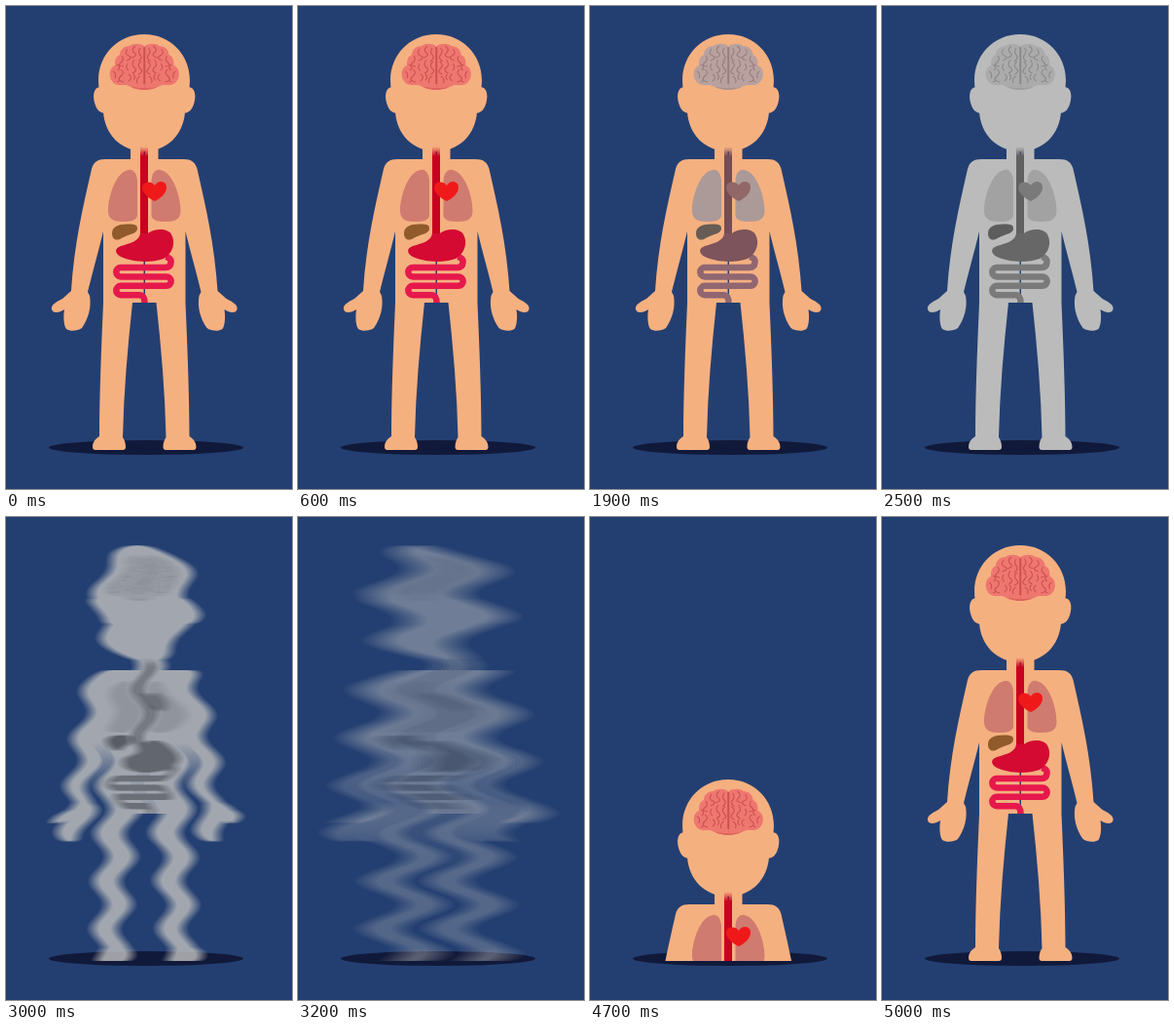
An HTML page with a canvas for the animation above (6000 ms loop, 294 by 495 pixels).

```html
<!DOCTYPE html>
<html lang="en">
<head>
<meta charset="utf-8">
<title>Body</title>
<style>
html, body { margin: 0; width: 100%; height: 100%; overflow: hidden; background: #233f71; }
canvas { display: block; width: 100%; height: 100%; }
</style>
</head>
<body>
<canvas id="stage" width="294" height="495"></canvas>
<script>
const W = 294, H = 495, LOOP = 6000, STEP = 100, FLOOR = 455, AXIS = 142.25;
const stage = document.getElementById('stage').getContext('2d');
const layer = () => {
  const c = document.createElement('canvas');
  c.width = W;
  c.height = H;
  return c.getContext('2d');
};
const figure = layer(), wavy = layer();

// Adds the mirror image of a half shape
const both = d => {
  const half = new Path2D(d), p = new Path2D(half);
  p.addPath(half, new DOMMatrix([-1, 0, 0, 1, 2 * AXIS, 0]));
  return p;
};

const skin = { rgb: [245, 176, 128], gray: 187 };
const head = new Path2D(`M95 76C95 50 115 29 142 29S189 50 189 76C189 90 184 98 184 108
  C183 131 166 149 142 149S101 131 100 108C100 98 95 90 95 76Z`);
const ears = both('M97 83C90 83 89 92 91 99C93 106 96 110 103 110V83Z');
const trunk = both(`M143 140H128V157H102C94 157 90 160 88 167C79 206 70 245 67 292L58 300
  C50 304 46 307 47 311C48 315 54 315 60 311C59 317 59 327 62 331C66 334 74 333 78 330
  C85 320 88 308 86 297L84 293C89 272 95 252 100 231V304C98 350 96 400 96 441
  C91 444 89 448 89 452Q89 455 92 455H120Q123 455 123 452C123 448 122 445 120 442
  C121 396 125 350 130 304H143Z`);

const gut = new Path2D(`M164 257Q170 258 169.5 263Q169 268 164 268H118a4.7 4.7 0 0 0 0 9.4
  H165a4.7 4.7 0 0 1 0 9.4H118a4.7 4.7 0 0 0 0 9.4H137Q142.5 296 142.5 304`);
const gutTone = { rgb: [230, 24, 76], gray: 122 };
const gulletTone = { rgb: [201, 3, 31], gray: 96 };

const lung = `M126 168C131 167 135 172 135 180V215C134 220 128 221 120 221
  C110 221 105 218 105 210C105 195 113 170 126 168Z`;
const lungTone = { rgb: [207, 123, 112], gray: 162 };
const mirrored = d => {
  const p = new Path2D();
  p.addPath(new Path2D(d), new DOMMatrix([-1, 0, 0, 1, 2 * AXIS, 0]));
  return p;
};
const organs = [
  { x: 122, y: 232, rgb: [144, 90, 43], gray: 93, path: new Path2D(`M113 226C118 223 130 223 134 225
    C136 228 135 231 131 233C125 235 120 237 117 239C111 241 109 237 109 233Q109 228 113 226Z`) },
  { x: 120, y: 195, ...lungTone, path: new Path2D(lung) },
  { x: 164.5, y: 195, ...lungTone, path: mirrored(lung) },
  { x: 143, y: 246, rgb: [212, 10, 50], gray: 103, path: new Path2D(`M138 233H146
    C152 228 166 227 170 234C175 243 171 254 162 259C148 264 128 262 118 257
    C111 253 112 248 118 246C128 243 137 241 138 233Z`) },
  { x: 153, y: 190, rgb: [240, 25, 25], gray: 122, path: new Path2D(`M153 200C146 197 140 191 140 186
    C140 180 149 178 153 184C156 178 165 179 165 186C165 192 159 197 153 200Z`) }
];

const lobes = both(`M142 41C138 38 130 38 127 41C121 41 117 45 117 50C112 52 112 57 112 61
  C106 63 105 72 109 77C112 82 119 81 124 81C129 84 137 84 142 84Z`);
const stem = new Path2D('M124 79Q142 76 160 79C156 84 150 86 142 86S128 84 124 79Z');
const folds = both(`M141.8 42V80M138 43Q135 47 138 50T136 57M133 41Q128 45 132 48T129 53
  M125 44Q121 49 126 51T124 56M119 51Q122 55 118 58T121 62M139 57Q134 60 138 64T136 70
  M132 55Q128 60 132 63T130 69M125 59Q122 64 126 66M114 60Q119 62 115 66M110 67Q114 69 112 74
  M118 65Q123 68 118 72T121 78M126 70Q131 73 126 77M138 72Q133 74 135 79M114 78Q118 77 116 74
  M131 70Q134 72 131 76`);

const clamp = v => Math.min(1, Math.max(0, v));
const ramp = (t, a, b) => clamp((t - a) / (b - a));
const tone = ({ rgb, gray }, k, alpha = 1) =>
  `rgba(${rgb.map(c => Math.round(c + (gray - c) * k))},${alpha})`;

function fill(g, path, color) {
  g.fillStyle = color;
  g.fill(path);
}

function line(g, path, color, width) {
  g.strokeStyle = color;
  g.lineWidth = width;
  g.stroke(path);
}

function scaled(g, x, y, s, draw) {
  g.save();
  g.translate(x, y);
  g.scale(s, s);
  g.translate(-x, -y);
  draw();
  g.restore();
}

// Quick beats that slow down and stop
function squeezed(t) {
  if (t < 700) return t / STEP % 2 === 1;
  return t < 900 || (t >= 1100 && t < 1300);
}

function drawFigure(g, t) {
  const alive = t >= 4000;
  const organGray = alive ? 0 : ramp(t, 1500, 2000);
  const bodyGray = alive ? 0 : ramp(t, 2000, 2500);
  const beat = squeezed(t) ? 0.94 : 1;
  g.clearRect(0, 0, W, H);
  for (const p of [trunk, ears, head]) fill(g, p, tone(skin, bodyGray));

  line(g, gut, tone(gutTone, organGray), 6.5);
  const fade = g.createLinearGradient(0, 144, 0, 154);
  fade.addColorStop(0, tone(gulletTone, organGray, 0));
  fade.addColorStop(1, tone(gulletTone, organGray));
  g.fillStyle = fade;
  g.fillRect(138, 144, 8, 94);
  for (const o of organs)
    scaled(g, o.x, o.y, beat, () => fill(g, o.path, tone(o, organGray)));

  scaled(g, AXIS, 62, beat, () => {
    fill(g, stem, tone({ rgb: [222, 99, 94], gray: 158 }, organGray));
    fill(g, lobes, tone({ rgb: [238, 119, 112], gray: 171 }, organGray));
    line(g, folds, tone({ rgb: [205, 80, 80], gray: 138 }, organGray), 1.1);
  });
}

// Shifts each row sideways, then smears the rows and fades them
function drawWavy(p) {
  const amp = 42 * p, smear = 36 * p, copies = 11;
  wavy.clearRect(0, 0, W, H);
  for (let y = 20; y < 460; y++) {
    const dx = amp * Math.cos((y - 152) / 49 * 2 * Math.PI);
    wavy.drawImage(figure.canvas, 0, y, W, 1, dx, y, W, 1);
  }
  figure.clearRect(0, 0, W, H);
  figure.globalCompositeOperation = 'lighter';
  figure.globalAlpha = 1 / copies;
  for (let i = 0; i < copies; i++)
    figure.drawImage(wavy.canvas, (i / (copies - 1) - 0.5) * 2 * smear, 0);
  figure.globalCompositeOperation = 'source-over';
  figure.globalAlpha = 1;
  stage.globalAlpha = 1 - p;
  stage.drawImage(figure.canvas, 0, 0);
  stage.globalAlpha = 1;
}

function render(time) {
  const t = Math.floor(time % LOOP / STEP) * STEP;
  stage.fillStyle = '#233f71';
  stage.fillRect(0, 0, W, H);
  stage.fillStyle = '#11193a';
  stage.beginPath();
  stage.ellipse(144, 452.5, 100, 7.5, 0, 0, 2 * Math.PI);
  stage.fill();
  if (t >= 3500 && t < 4500) return;

  drawFigure(figure, t);
  const melt = ramp(t, 2900, 3500);
  if (t < 4500 && melt > 0) return drawWavy(melt);
  const drop = t < 4500 ? 0 : Math.round(480 * (1 - ramp(t, 4400, 5000)));
  stage.drawImage(figure.canvas, 0, 0, W, FLOOR - drop, 0, drop, W, FLOOR - drop);
}

const start = performance.now();
function tick() {
  render(performance.now() - start);
  requestAnimationFrame(tick);
}
tick();
</script>
</body>
</html>
```
